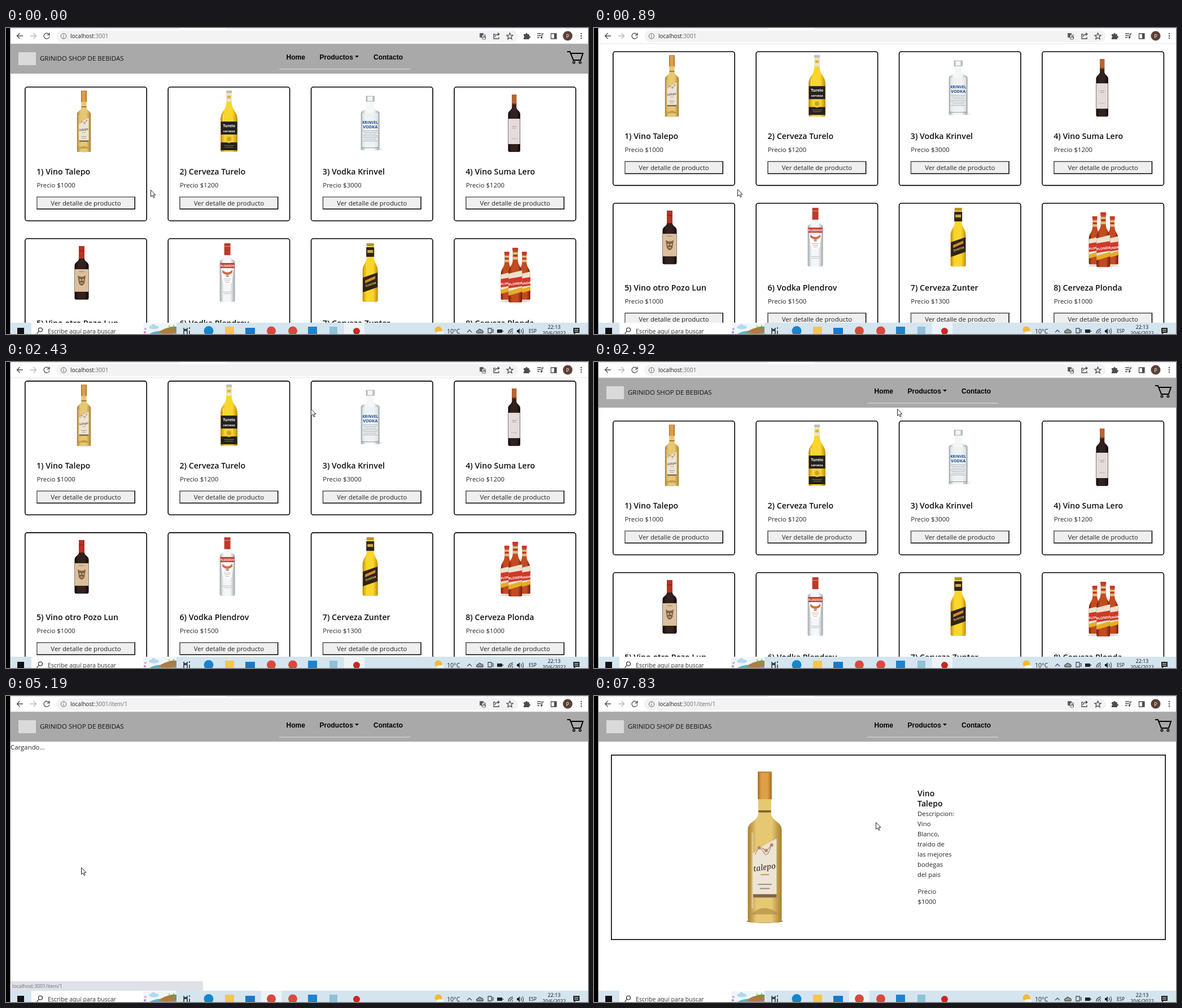
An HTML page for the animation above (8 s loop, 1031x543 px).

```html
<!DOCTYPE html>
<html lang="es">
<head>
<meta charset="utf-8">
<title>Tienda de bebidas</title>
<style>
html, body { margin: 0; width: 100%; height: 100%; overflow: hidden; background: #fff; }
svg { display: block; width: 100%; height: 100%; }
text { font: 11.4px "Open Sans", "Noto Sans", sans-serif; fill: #212529; }
.title { font-size: 14.2px; font-weight: 600; fill: #111; }
.nav { font: bold 12px "Liberation Sans", Arial, sans-serif; fill: #000; }
.brand { font-size: 11.5px; fill: #111; }
.url { font-size: 10px; fill: #202124; }
.dim { fill: #6b6f74; }
.tray { font-size: 8.8px; fill: #111; }
.mid { text-anchor: middle; }
.line { fill: none; stroke: #4a4d51; stroke-width: 1.3; }
</style>
</head>
<body>
<svg id="stage" viewBox="0 0 1031 543" preserveAspectRatio="none"></svg>
<script>
const rect = (x, y, w, h, fill, more = '') =>
  `<rect x="${x}" y="${y}" width="${w}" height="${h}" fill="${fill}" ${more}/>`;
const circle = (x, y, r, fill, more = '') => `<circle cx="${x}" cy="${y}" r="${r}" fill="${fill}" ${more}/>`;
const path = (d, fill, more = '') => `<path d="${d}" fill="${fill}" ${more}/>`;
const line = (d, more = '') => `<path class="line" d="${d}" ${more}/>`;
const text = (x, y, s, cls = '', more = '') => `<text x="${x}" y="${y}" class="${cls}" ${more}>${s}</text>`;
const at = (x, y, body, more = '') => `<g transform="translate(${x} ${y}) ${more}">${body}</g>`;
const group = (id, body) => `<g id="${id}">${body}</g>`;

// Bottles: origin at the top centre
const glassColors = {
  gold: ['#a97e2b', '#e6c873'], beer: ['#c28a05', '#f9d62c'], clear: ['#9fa8ad', '#f4f6f7'],
  dark: ['#0c0709', '#33211f'], red: ['#701c0c', '#c44b20'], cap: ['#a8641c', '#dda049']
};
const gradients = Object.entries(glassColors).map(([id, [edge, core]]) =>
  `<linearGradient id="${id}"><stop stop-color="${edge}"/><stop offset=".25" stop-color="${core}"/>` +
  `<stop offset=".7" stop-color="${core}"/><stop offset="1" stop-color="${edge}"/></linearGradient>`).join('');

function bottle(glass, width, neck, height, from, to) {
  const n = neck / 2, w = width / 2, m = (from + to) / 2;
  return path(`M${-n} 0H${n}V${from}C${n} ${m} ${w} ${m} ${w} ${to}V${height - 3}q0 3-3 3H${3 - w}q-3 0-3-3` +
    `V${to}C${-w} ${m} ${-n} ${m} ${-n} ${from}Z`, `url(#${glass})`);
}
const band = (w, y, h, fill, more) => rect(-w / 2, y, w, h, fill, more);
const mark = (y, s, size, fill, more = '') =>
  text(0, y, s, 'mid', `style="font-size:${size}px;font-weight:700;fill:${fill}" ${more}`);
const scribble = (y, rows, w, color) => Array.from({ length: rows }, (_, i) =>
  band(w - i % 3 * 3, y + i * 3, .8, color)).join('');

const whiteWine = '<ellipse cy="108" rx="13" ry="1.2" fill="#77705f"/>' +
  bottle('gold', 24.4, 9.4, 109, 30, 42) + band(10, 0, 20, 'url(#cap)') + band(10, 0, 1, '#c58a3a') +
  band(9, 28, 1.5, '#80602b') + path('M-8.5 59Q-3 54 8.5 48.5V91H-8.5Z', '#ece4d5') +
  line('M-7 60q3-8 6-2t6-6M-2 55q4 4 7-3', 'style="stroke:#b58a72;stroke-width:.5"') +
  [[-4, 55], [1, 57], [5, 53]].map(([x, y]) => circle(x, y, 1.2, '#b18775')).join('') +
  text(0, 71, 'talepo', 'mid', 'style="font:italic 5.6px Noto Serif,serif;fill:#352b25" transform="rotate(-8 0 71)"') +
  scribble(74, 1, 6, '#c09a63') + scribble(81, 2, 10, '#998b7a') + band(17, 88.5, 2.4, '#80653e') +
  rect(-9.5, 44, 1.3, 55, '#fff', 'opacity=".35"') + path('M-10 103Q0 94 10 103Z', '#a8853a', 'opacity=".6"');

const lightBeer = bottle('beer', 30, 9.5, 109, 20, 52) + band(10, 0, 4, '#b9bfc4') + band(9, 5, 15, '#e9e5d0') +
  band(6, 9, 5, '#dfb531') + band(29, 55, 23, '#24221f') + mark(65, 'Turelo', 7, '#fff') + mark(74, 'cerveza', 5.5, '#fff') +
  band(29, 92, 14, '#24221f') + circle(0, 86, 7, '#f4cf35') + circle(0, 86, 4, '#d5a317') + scribble(97, 2, 18, '#a28b46') +
  rect(-11, 42, 2, 13, '#fff', 'opacity=".5"');

const plainVodka = rect(-18, 92, 39, 4, '#eceeef', 'rx="2"') + bottle('clear', 33, 12, 96, 20, 30) +
  band(14, 0, 9, 'url(#clear)', 'stroke="#8d969b" stroke-width=".7"') + rect(-14, 30, 28, 60, '#edf0f1', 'opacity=".75"') +
  mark(49, 'KRINVEL', 6.6, '#174a94') + mark(57, 'VODKA', 7.4, '#174a94') + scribble(61, 7, 26, '#9da4ab') +
  band(30, 91, 1, '#909aa0');

const darkWine = bottle('dark', 21.5, 8, 102, 22, 35) + band(8, 0, 18, '#bd622d') + band(8, 16, 2, '#70321a') +
  band(20.5, 43, 45, '#e4dcda') + scribble(56, 2, 9, '#b38a7d') + scribble(78, 1, 10, '#b8aaa5');

const maskWine = bottle('dark', 25, 9.5, 95, 21, 35) + band(10, 0, 22, '#b83222') + band(10, 8, 1, '#84190f') +
  band(24, 41, 40, '#dcc09c') + scribble(45, 1, 9, '#8c6d50') +
  path('M-7 52Q0 57 7 52L5 66Q0 74-5 66Z', '#846246') + circle(-2.5, 60, 1.5, '#e5c9a6') + circle(2.5, 60, 1.5, '#e5c9a6') +
  band(5, 65, 1.2, '#e5c9a6');

const redVodka = bottle('clear', 27, 10, 104, 23, 34) + band(11, 0, 21, '#bd3a2d') + band(11, 5, 1, '#e1a098') +
  band(25, 35, 9, '#c43f31') + mark(42, 'PLENDROV', 4.6, '#fff') + path('M-11 45H11L8 70Q0 76-8 70Z', '#fff') +
  path('M-9 47Q0 56 9 47V52Q0 60-9 52Z', '#d66a50') + mark(60, '40', 5, '#a7503f') + scribble(63, 3, 13, '#bd9b8d') +
  scribble(86, 2, 16, '#aeb5b8');

const goldBeer = bottle('beer', 27, 12, 104, 22, 50) + band(13, 0, 5, '#b8922b') + band(14, 7, 17, '#2d2418') +
  band(10, 12, 5, '#d1a742') + path('M-13 61L13 52V78L-13 87Z', '#302315') +
  path('M-9 66L9 58V63L-9 71Z', '#d58a30') + mark(75, 'ZUNTER', 5, '#efd175', 'transform="rotate(-18 0 70)"');

const redBeer = bottle('red', 24, 9, 97, 20, 46) + band(10, 0, 5, '#c9392b') + band(9, 8, 13, '#e0be87') +
  band(8, 12, 4, '#c93123') + path('M-12 46L12 40V74L-12 81Z', '#ede2cd') + path('M-12 77L12 70V78L-12 85Z', '#e5ad28') +
  path('M-12 55L12 51V68L-12 72Z', '#cf3829') + mark(66, 'PLONDA', 6, '#fff', 'transform="rotate(-8 0 62)"');
const beerTrio = '<ellipse cy="95" rx="27" ry="2" fill="#ded7d2"/>' +
  at(-15, 7, redBeer, 'scale(.88)') + at(16, 7, redBeer, 'scale(.88)') + redBeer;

const drinks = [
  ['Vino Talepo', 1000, 105, 7, whiteWine], ['Cerveza Turelo', 1200, 108.7, 7, lightBeer],
  ['Vodka Krinvel', 3000, 105.4, 17, plainVodka], ['Vino Suma Lero', 1200, 107, 14, darkWine],
  ['Vino otro Pozo Lun', 1000, 101, 14, maskWine], ['Vodka Plendrov', 1500, 105.7, 9, redVodka],
  ['Cerveza Zunter', 1300, 105.4, 9, goldBeer], ['Cerveza Plonda', 1000, 109, 17, beerTrio]
];

const card = ([name, price, x, y, art], i) => at(33 + 253.4 * (i % 4), 104 + 269 * (i >> 2),
  rect(.8, .8, 215.4, 237.4, '#fff', 'rx="4" stroke="#000" stroke-width="1.6"') + at(x, y, art) +
  text(21, 156, `${i + 1}) ${name}`, 'title') + text(21.5, 179, 'Precio $' + price) +
  rect(21, 195, 175, 23, '#000') + path('M21 218V195H196l-1.5 1.5H22.5V216.5Z', '#767676') +
  rect(22.5, 196.5, 172, 20, '#efefef') + text(108.5, 211, 'Ver detalle de producto', 'mid'));

const tab = (id, x, w, label) => group(id,
  path(`M${x + .5} 67V40q0-3.500 3.500-3.500h${w - 8}q3.500 0 3.500 3.500V67Z`, 'none', 'stroke="#e9ecef"') +
  text(x + 12.5, 56, label, 'nav'));
const header = rect(8, 28, 1023, 53, '#a9a9a9') + rect(22, 43, 31, 23, '#dadada') +
  text(60, 58, 'GRINIDO SHOP DE BEBIDAS', 'brand') + rect(484, 72.5, 232, 1, '#dee2e6') +
  tab('home', 484, 59, 'Home') + tab('products', 543, 95, 'Productos') + path('M618 49h7l-3.500 3.800Z', '#000') +
  text(651, 56, 'Contacto', 'nav') +
  line('M994 42h5l6 15h13l4-12h-21', 'style="stroke:#000;stroke-width:2"') +
  circle(1006, 61, 1.8, 'none', 'stroke="#000" stroke-width="1.4"') + circle(1017, 61, 1.8, 'none', 'stroke="#000" stroke-width="1.4"');

const description = ['Descripcion:', 'Vino', 'Blanco,', 'traido de', 'las mejores', 'bodegas', 'del pais'];
const detail = rect(30.8, 104.8, 981.4, 327.4, '#fff', 'stroke="#000" stroke-width="1.6"') +
  at(302.5, 134, whiteWine, 'scale(2.46)') + text(573, 178, 'Vino', 'title') + text(573, 196, 'Talepo', 'title') +
  description.map((s, i) => text(573, 213 + 18 * i, s)).join('') + text(573.5, 351, 'Precio') + text(573.5, 369, '$1000');

const toolbar = rect(8, 0, 1023, 28, '#fff') + rect(8, 0, 300, 1, '#dee1e6') + rect(390, 0, 641, 1, '#dee1e6') +
  rect(89, 4, 818, 21, '#f1f3f4', 'rx="10.5"') + rect(8, 27.500, 1023, .7, '#dadce0') +
  line('M30 14H19.500M24.500 9l-5 5 5 5') + line('M43 14H53.500M48.500 9l5 5-5 5', 'opacity=".4"') +
  line('M76 11a5 5 0 1 0 1 4M77 8.500V12.500H73') +
  circle(102, 14.500, 4.700, 'none', 'stroke="#5f6368"') + rect(101.500, 13.800, 1, 3.500, '#5f6368') + rect(101.500, 11.700, 1, 1.200, '#5f6368') +
  `<text x="114" y="18" class="url">localhost<tspan id="path" class="dim"></tspan></text>` +
  rect(839, 9, 7, 8, '#5f6368', 'rx="1"') + rect(843.500, 12, 6, 8, '#fff', 'rx="1" stroke="#5f6368"') +
  line('M845 18l2-4 2 4M841 12h3') +
  line('M867 11h-3v8h9v-3M866 16q1-5 7-5M871 8.500l3 2.500-3 2.500', 'stroke-width="1"') +
  line('M892.500 9l1.600 3.700 4 .3-3 2.600 1 4-3.600-2.200-3.600 2.200 1-4-3-2.600 4-.3Z') +
  path('M917 11h3.500a1.700 1.700 0 1 1 3.300 0h3v3.300a1.700 1.700 0 1 1 0 3.300V20h-9.800v-3a1.700 1.700 0 0 0 0-3.300Z', '#4a4d51') +
  line('M941 10h7M941 13.500h7M941 17h4M949.500 17V10.500h3') + circle(948.500, 17, 1.700, '#4a4d51') +
  line('M965.500 10h9.500v9h-9.500Z') + rect(971, 10, 4, 9, '#4a4d51') +
  circle(995, 14, 8.500, '#5d4037') + text(995, 17.500, 'P', 'mid', 'style="font-size:9px;fill:#fff"') +
  [10, 14, 18].map(y => circle(1019, y, 1.200, '#4a4d51')).join('');

const beach = rect(243, 524, 59, 19, '#eef7fa') + path('M254 543q12-7 26-5l22-3v8Z', '#55b6c4') +
  path('M270 540q12-10 32-9v9q-18 4-32 0Z', '#b27a45') + path('M284 533q9-5 18-3v3Z', '#6b9a47') +
  '<ellipse cx="262" cy="531" rx="9" ry="3.500" fill="#b6d7ed"/>' + circle(261, 529, 3.500, '#b6d7ed') +
  circle(247, 534, 2, '#d9a4cd') + circle(246, 540, 2, '#b885c4') + circle(289, 529, 1.500, '#f2bf42') + circle(297, 528, 1, '#4b9ed4');
const taskbar = rect(8, 523, 1023, 20, '#d4e5f0') + rect(0, 523, 36, 20, '#edf4f8', 'id="active"') +
  rect(20, 532, 12, 11, '#111') + rect(45, 523, 257, 20, '#fff') +
  circle(61, 535.500, 3.500, 'none', 'stroke="#222" stroke-width="1.200"') + line('M58.500 538l-4 4.500') +
  text(74, 542, 'Escribe aquí para buscar', '', 'style="font-size:10.6px;fill:#333"') + beach +
  line('M315 532v3h6v-3M315 543v-6h6v6M325 531v3M325 537v6', 'style="stroke:#111"') +
  circle(359, 537.500, 8.500, '#1686c9') + rect(388, 530, 16, 13, '#f4c64f') + rect(424, 532, 17, 11, '#1a79c7') +
  circle(470, 537.500, 8, '#d9493b') + circle(508, 537.500, 8, '#d9493b') + rect(535, 530, 16, 13, '#1d83cd') +
  rect(573, 530, 14, 13, '#8fc1d8') + circle(621, 538, 6, '#cf2424') +
  circle(766, 536, 6.500, '#f5b92f') + '<ellipse cx="769" cy="541" rx="7" ry="3" fill="#f3f6f8"/>' +
  text(781, 542, '10°C', '', 'style="font-size:10.6px"') + line('M817 540l4-4 4 4') +
  path('M834 541q-2-4 2-4 2-5 6-1 4 0 3 5Z', '#999', 'stroke="#222"') +
  line('M854 533h6v8h-6ZM861 536l2-1v5l-2-1') + rect(870, 535, 9, 6, '#222') + rect(879.500, 537, 1.500, 2, '#222') +
  line('M890 542q0-7 8-8M893 542q0-4 5-5M896 542l2-2') +
  path('M905 536h2l3-3v10l-3-3h-2Z', '#222') + line('M912 535q2 3 0 6M915 533q3 5 0 10') +
  text(926, 541, 'ESP', 'tray', 'style="font-size:8.200px"') + text(971, 534, '22:13', 'tray mid') + text(971, 545, '20/6/2022', 'tray mid') +
  path('M1005 532h11v9h-7l-3 3v-3h-1Z', '#222') + line('M1007 535h7M1007 538h7', 'style="stroke:#fff;stroke-width:1"');

const bubble = path('M8 506H345q4 0 4 4V523H8Z', '#dee1e6') +
  text(11.500, 518, 'localhost:3001/item/1', 'dim', 'style="font-size:8.700px"');
const outlineStyle = 'stroke="#111" stroke-width=".9" stroke-linejoin="round"';
const arrow = path('M.5 .5V12.500L3.300 9.900 5.300 14.300 7.200 13.500 5.300 9.200H9Z', '#fff', outlineStyle);
const hand = path('M-1.500 10V1Q0-1.200 1.300 1V6Q2.800 5 3.700 6.600 5.500 6 6 7.600 7.300 7.400 7.200 9V12.500L5.800 17H-.5' +
  'Q-2 14-4.700 11.300-5 8.500-2.800 9.300Z', '#fff', outlineStyle) + line('M1.300 6V9.500M3.700 7V10M6 8V10', 'style="stroke:#111;stroke-width:.7"');

const stage = document.getElementById('stage');
stage.innerHTML = `<defs>${gradients}<clipPath id="view">${rect(8, 28, 1023, 495, '#000')}</clipPath></defs>` +
  rect(0, 0, 1031, 543, '#fff') +
  `<g clip-path="url(#view)">${group('page', header + group('list', drinks.map(card).join('')) +
    group('loading', text(8, 95, 'Cargando...')) + group('detail', detail))}</g>` +
  group('bubble', bubble) + toolbar + taskbar + rect(0, 0, 7.500, 543, '#000') +
  group('cursor', group('arrow', arrow) + group('hand', hand));
const el = id => document.getElementById(id);

const clamp = v => Math.max(0, Math.min(1, v));
const smooth = u => u * u * (3 - 2 * u);
function tween(keys, t) {
  const i = keys.findIndex(k => k[0] > t);
  if (i < 0) return keys[keys.length - 1].slice(1);
  const [a, b] = [keys[i - 1], keys[i]];
  const u = smooth((t - a[0]) / (b[0] - a[0]));
  return a.slice(1).map((v, j) => v + (b[j + 1] - v) * u);
}

const DURATION = 8000, CLICK = 4780, LOADED = 6930;
const scrollKeys = [[0, 0], [400, 96], [800, 96], [1030, 0], [2090, 0], [2290, 96], [2366, 96], [2560, 0]];
const cursorKeys = [
  [0, 256, 287], [400, 254, 286], [1030, 254, 286], [1600, 530, 102], [1780, 542, 83], [1930, 542, 83],
  [1950, 540, 83], [2900, 540, 83], [3250, 230, 84], [3450, 420, 35], [3600, 505, 50], [3720, 556, 56],
  [3760, 569, 58], [3850, 572, 58], [4510, 134, 300], [4560, 134, 300], [4600, 132, 304], [5170, 132, 304],
  [5680, 361, 245], [7350, 361, 245], [7830, 499, 224]
];

const show = (id, on) => el(id).style.display = on ? '' : 'none';
function hover(id, t, enter, leave) {
  const k = clamp((t - enter) / 150) - clamp((t - leave) / 150);
  el(id).firstChild.style.opacity = k;
  el(id).lastChild.style.fill = `rgb(${10 * k},${88 * k},${202 * k})`;
}

function draw(t) {
  const [scroll] = tween(scrollKeys, t), [x, y] = tween(cursorKeys, t);
  const shopping = t < CLICK;
  const inside = (l, top, r, b) => x >= l && x <= r && y >= top && y <= b;
  const pointing = inside(484, 36, 638, 67) || shopping && inside(54, 299, 229, 322) && t > 4000;

  el('page').setAttribute('transform', `translate(0 ${-scroll})`);
  el('cursor').setAttribute('transform', `translate(${Math.round(x)} ${Math.round(y)})`);
  show('hand', pointing);
  show('arrow', !pointing);
  show('list', shopping);
  show('loading', !shopping && t < LOADED);
  show('detail', t >= LOADED);
  show('bubble', !shopping);
  el('bubble').style.opacity = 1 - clamp((t - 5190) / 200);
  el('path').textContent = shopping ? ':3001' : ':3001/item/1';
  el('active').setAttribute('x', shopping ? 599 : 452);
  hover('home', t, 3580, 3700);
  hover('products', t, 3740, 3890);
}

const start = performance.now();
function tick() {
  draw((performance.now() - start) % DURATION);
  requestAnimationFrame(tick);
}
tick();
</script>
</body>
</html>
```
